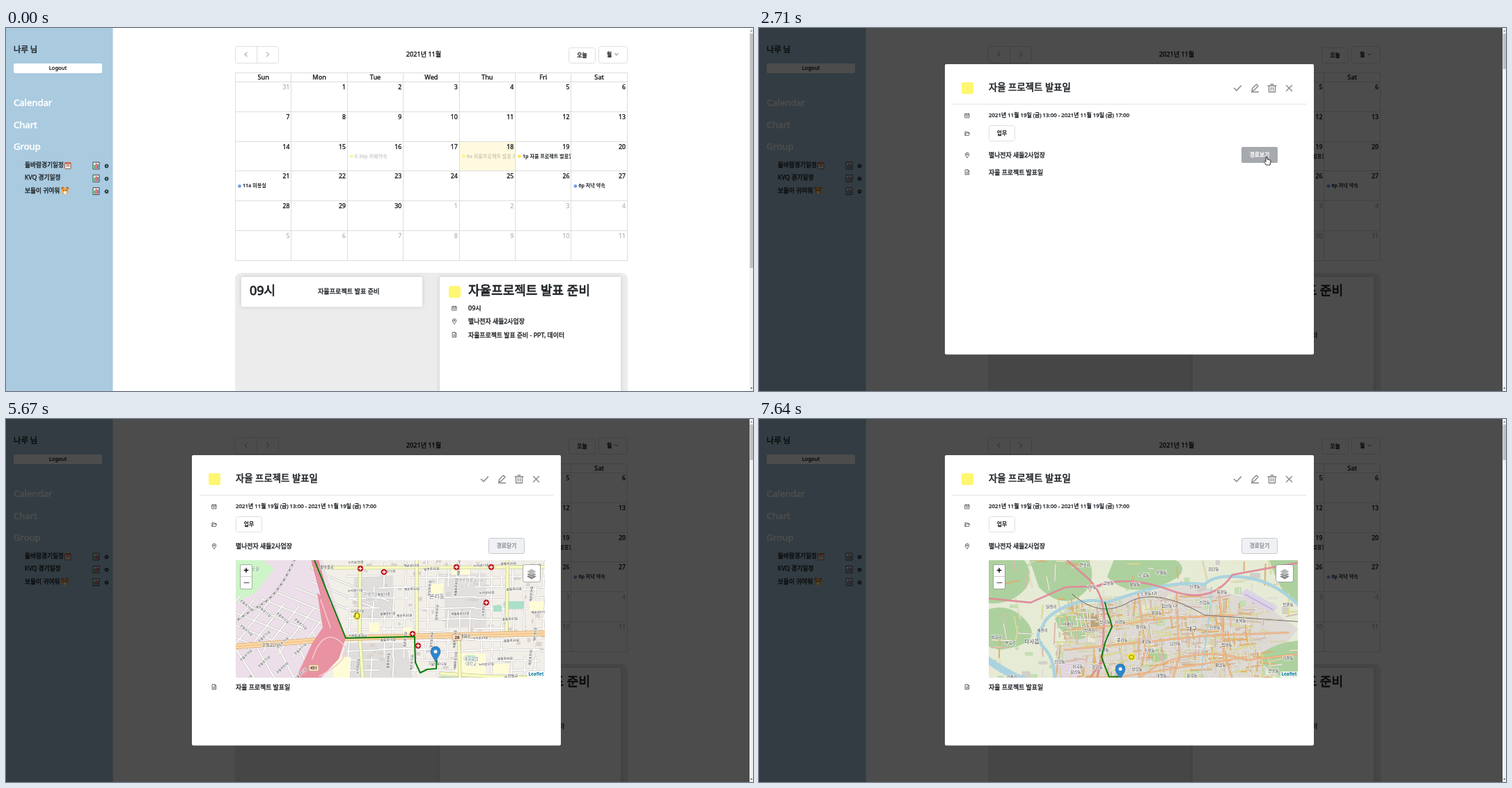
Recreate the animation shown at these times as an HTML page with a canvas. Size 1073x522 px, loop 8 s.

```html
<!DOCTYPE html>
<html lang="ko">
<head>
<meta charset="utf-8">
<title>Calendar</title>
<style>
html, body { margin: 0; width: 100%; height: 100%; overflow: hidden; background: #fff; }
canvas { display: block; }
</style>
</head>
<body>
<canvas id="stage" width="1073" height="522"></canvas>
<script>
const LOOP = 8000;
const FONT = "'Noto Sans', 'Noto Sans CJK KR', 'Noto Sans CJK JP', sans-serif";
const INK = '#212529', YELLOW = '#fff671';
const PLACE = '별나전자 새들2사업장';
let g = document.getElementById('stage').getContext('2d');

// ---------- helpers ----------
// A hairline stroke turns the regular weight into a medium one
function text(s, x, y, size, color = INK, align = 'left', weight = 400) {
  g.font = `${weight} ${size}px ${FONT}`;
  g.textAlign = align;
  g.textBaseline = 'middle';
  g.fillStyle = g.strokeStyle = color;
  g.fillText(s, x, y);
  if (weight > 400) return;
  g.lineWidth = size * .045;
  g.lineJoin = 'round';
  g.strokeText(s, x, y);
}
function label(s, x, y, size, color = '#333', angle = 0) {
  g.save();
  g.translate(x, y);
  g.rotate(angle);
  g.font = `500 ${size}px ${FONT}`;
  g.textAlign = 'center';
  g.textBaseline = 'middle';
  g.lineJoin = 'round';
  g.lineWidth = 1.6;
  g.strokeStyle = 'rgba(255,255,255,.75)';
  g.strokeText(s, 0, 0);
  g.fillStyle = color;
  g.fillText(s, 0, 0);
  g.restore();
}
function box(x, y, w, h, r, fill, stroke) {
  g.beginPath();
  g.roundRect(x, y, w, h, r);
  if (fill) { g.fillStyle = fill; g.fill(); }
  if (stroke) { g.strokeStyle = stroke; g.lineWidth = 1; g.stroke(); }
}
function dot(x, y, r, fill) {
  g.beginPath();
  g.arc(x, y, r, 0, 7);
  g.fillStyle = fill;
  g.fill();
}
function draw(d, x, y, stroke, width = 1, fill) {
  const p = new Path2D(d);
  g.save();
  g.translate(x, y);
  if (fill) { g.fillStyle = fill; g.fill(p); }
  if (stroke) {
    g.strokeStyle = stroke;
    g.lineWidth = width;
    g.lineJoin = g.lineCap = 'round';
    g.stroke(p);
  }
  g.restore();
}
const area = (d, fill) => draw('M' + d + 'Z', 0, 0, null, 0, fill);
function road(d, width, fill, edge) {
  if (edge) draw('M' + d, 0, 0, edge, width + 1.2);
  draw('M' + d, 0, 0, fill, width);
}
function seeded(seed) {
  return () => {
    seed = (seed * 16807) % 2147483647;
    return seed / 2147483647;
  };
}
function layer(x, y, w, h, k, paint) {
  const c = document.createElement('canvas'), main = g;
  c.width = w * k;
  c.height = h * k;
  g = c.getContext('2d');
  g.scale(k, k);
  g.translate(-x, -y);
  paint();
  g = main;
  return () => g.drawImage(c, x, y, w, h);
}

// ---------- icons ----------
const icon = {
  calendar(x, y) {
    draw('M-3-2.5H3V3H-3ZM-3-.8H3M-1.5-3.3V-2M1.5-3.3V-2M-1.5 1H1.5', x, y, '#555', .8);
  },
  folder(x, y) { draw('M-3 2.5V-2.5H-.5L.3-1.5H2.5V-.5M-3 2.5L-1.8-.5H3.5L2.5 2.5Z', x, y, '#444', .8); },
  pin(x, y) {
    draw('M0 3.5C-1.5 1.5-2.7.5-2.7-1A2.7 2.7 0 0 1 2.7-1C2.7.5 1.5 1.5 0 3.5ZM-.9-1A.9.9 0 0 0 .9-1A.9.9 0 0 0-.9-1', x, y, '#444', .8);
  },
  note(x, y) { draw('M-2.5-3.5H1L2.7-1.8V3.5H-2.5ZM1-3.5V-1.8H2.7M-1.2 0H1.4M-1.2 1.7H1.4', x, y, '#444', .8); },
  chart(x, y) {
    box(x - 4.5, y - 5, 9, 10, 0, '#eef3f5', '#38474f');
    box(x - 3, y - 1, 1.7, 5, 0, '#3f9b4b');
    box(x - .8, y - 3.5, 1.7, 7.5, 0, '#d6473f');
    box(x + 1.5, y - 2, 1.7, 6, 0, '#2d77c4');
  },
  gear(x, y) {
    g.setLineDash([1.2, .8]);
    draw('M-2.2 0A2.2 2.2 0 0 1 2.2 0A2.2 2.2 0 0 1-2.2 0', x, y, '#27333b', 1.4);
    g.setLineDash([]);
    draw('M-1.5 0A1.5 1.5 0 0 1 1.5 0A1.5 1.5 0 0 1-1.5 0', x, y, '#27333b', 1);
  }
};

// ---------- calendar page ----------
const colX = i => 329.5 + i * 80.4, rowY = i => 77.5 + i * 42.8;

function calEvent(col, row, s, color, alpha = 1) {
  const x = colX(col), y = rowY(row) + 21.5;
  g.save();
  g.beginPath();
  g.rect(x, y - 8, 79.5, 16);
  g.clip();
  g.globalAlpha = alpha;
  dot(x + 6, y, 2.4, color);
  g.globalAlpha = alpha * (alpha < 1 ? .6 : 1);
  text(s, x + 10.5, y, 7.1, INK, 'left', 700);
  g.restore();
}

const page = layer(0, 0, 1073, 522, 1, () => {
  box(0, 0, 1073, 522, 0, '#fff');
  box(0, 0, 153.5, 522, 0, '#a9cadf');
  text('나루 님', 11, 32, 11.3);
  box(11, 51, 127, 14, 2, '#fff');
  text('Logout', 74.5, 58, 7.6, INK, 'center');
  ['Calendar', 'Chart', 'Group'].forEach((s, i) => text(s, 11, 108.5 + i * 31.5, 13.1, '#fff'));
  ['들바람경기일정', 'KVQ 경기일정', '보들이 귀여워'].forEach((s, i) => {
    const y = 198 + i * 18.3;
    text(s, 27, y - (i == 1 ? 1 : 0), 8.7);
    icon.chart(129.5, y);
    icon.gear(144.5, y + .5);
  });
  box(84.5, 193.5, 8.5, 9, 1, '#f6efe6', '#8b5a45');
  box(84.5, 193, 8.5, 2.5, 0, '#d55a3e');
  text('31', 88.8, 199, 4.5, '#8b3a2a', 'center', 700);
  dot(81.5, 230.5, 2, '#b5642a');
  dot(88, 230.5, 2, '#b5642a');
  dot(84.8, 234.5, 4.8, '#f0a443');
  dot(84.8, 236.7, 2.2, '#fff0d8');
  dot(83, 233.5, .7, INK);
  dot(86.6, 233.5, .7, INK);

  box(329.5, 26.5, 62, 24, 3, '#fff', '#dcdfe6');
  draw('M360.5 26.5V50.5', 0, 0, '#dcdfe6');
  draw('M1.5-3L-1.5 0L1.5 3', 344.5, 38, '#777', .9);
  draw('M-1.5-3L1.5 0L-1.5 3', 376, 38, '#777', .9);
  text('2021년 11월', 600, 38.5, 9.1, INK, 'center');
  box(808.5, 28.5, 38, 22, 3, '#fff', '#dcdfe6');
  text('오늘', 827.5, 39.5, 7.8, INK, 'center');
  box(851.5, 26.5, 41, 24, 3, '#fff', '#dcdfe6');
  text('월', 866.5, 39, 7.8, INK, 'center');
  draw('M-2.5-1.3L0 1.2L2.5-1.3', 877, 38, '#555', .9);

  box(colX(4), rowY(2), 80.4, 42.8, 0, '#fffadf');
  let lines = '';
  for (let i = 0; i < 8; i++) lines += `M${Math.floor(colX(i)) + .5} 64.5V334.5`;
  for (let i = 0; i < 7; i++) lines += `M329.5 ${Math.floor(rowY(i)) + .5}H892.5`;
  draw(lines + 'M329.5 64.5H892.5', 0, 0, '#ddd');
  'Sun Mon Tue Wed Thu Fri Sat'.split(' ').forEach((s, i) => text(s, colX(i) + 40.2, 71, 9.2, INK, 'center'));
  for (let i = 0; i < 42; i++) {
    const inMonth = i > 0 && i < 31;
    const n = i ? (i - 1) % 30 + 1 : 31;
    text(n, colX(i % 7) + 78, rowY(Math.floor(i / 7)) + 8, 8.7, inMonth ? INK : '#bcbebf', 'right');
  }
  calEvent(2, 2, '5:30p 카페약속', '#f5e800', .38);
  calEvent(4, 2, '9a 자율프로젝트 발표 준비', '#f5e800', .38);
  calEvent(5, 2, '1p 자율 프로젝트 발표일', '#fbe94d');
  calEvent(0, 3, '11a 미용실', '#6f9ff0');
  calEvent(6, 3, '6p 저녁 약속', '#6f9ff0');

  box(329, 352, 564, 190, 9, '#ececec');
  g.shadowColor = 'rgba(0,0,0,.14)';
  g.shadowBlur = 6;
  box(338, 358, 260, 43, 2, '#fff');
  box(623, 358, 260, 190, 2, '#fff');
  g.shadowBlur = 0;
  g.shadowColor = 'transparent';
  text('09시', 350, 379, 18);
  text('자율프로젝트 발표 준비', 448, 379.5, 9.1);
  box(636, 371, 17, 17, 3, YELLOW);
  text('자율프로젝트 발표 준비', 664, 379, 18);
  icon.calendar(644, 403);
  icon.pin(644, 422);
  icon.note(644, 441);
  text('09시', 664, 403.5, 9);
  text(PLACE, 664, 422.5, 8.9);
  text('자율프로젝트 발표 준비 - PPT, 데이터', 664, 442, 8.9);
});

function scrollbar(end) {
  box(1068, 0, 5, 522, 0, '#f1f1f1');
  box(1068.5, 8, 4.5, end - 8, 0, '#c1c1c1');
  draw('M-1.5 1L0-1L1.5 1Z', 1070.7, 4, null, 0, '#777');
  draw('M-1.5-1L0 1L1.5-1Z', 1070.7, 518, null, 0, '#444');
}

// ---------- map, street level (marker at 617,350) ----------
const nearMap = layer(120, 100, 930, 370, 1, () => {
  const rnd = seeded(77);
  box(120, 100, 930, 370, 0, '#f2efe9');
  area('120 100L420 100L455 205L488 315L400 470L120 470', '#ecdfe9');
  area('490 322L575 322L585 378L520 420L490 470L430 470', '#dfdedd');
  area('500 225L556 225L556 288L500 288', '#dfdedd');
  area('630 222L690 222L690 300L630 300', '#e2e0df');
  area('120 100L400 100L368 203L385 215L358 250L330 264L120 300', '#cdf5c8');

  // blocks of buildings
  for (let i = 0; i < 420; i++) {
    const x = 490 + rnd() * 540, y = 110 + rnd() * 340;
    box(x, y, 3 + rnd() * 6, 2 + rnd() * 4, 0, '#dbd3cd');
  }
  // side streets
  let grid = '';
  for (let x = 494; x < 1040; x += 15.5)
    for (let y = 105; y < 460; y += 34)
      if (rnd() < .72) grid += `M${x + rnd() * 4} ${y}l${rnd() * 3 - 3} 34`;
  for (let y = 106; y < 460; y += 15)
    for (let x = 490; x < 1040; x += 46)
      if (rnd() < .72) grid += `M${x} ${y + rnd() * 4}l46 ${rnd() * 3 - 2}`;
  for (let i = 0; i < 14; i++)
    grid += `M${150 + i * 24} ${450 - i * 7}l${-60 + i * 3} -52M${190 + i * 21} ${225 + i * 4}l-52 66M${150 + i * 24} ${330 - i * 8}l88 36`;
  road(grid.slice(1), 1.8, '#fff', '#cbc6c2');

  [[470, 342, 24, 32], [645, 337, 44, 30], [610, 237, 18, 14], [522, 293, 14, 14], [640, 215, 26, 9],
   [570, 300, 14, 9], [700, 352, 22, 14], [752, 262, 20, 14]].forEach(r => box(...r, 0, '#fdfcd6'));
  [[716, 262, 28, 11], [700, 268, 12, 9], [660, 340, 14, 8]].forEach(r => box(...r, 0, '#aae0cb'));
  area('515 470L524 422L536 404L590 382L625 370L690 373L682 470', '#add19e');
  for (let i = 0; i < 14; i++) text('ılı', 560 + rnd() * 110, 394 + rnd() * 38, 4, '#8bb67d');

  draw('M420 190Q395 250 368 266T300 312L200 350', 0, 0, '#8c8c8c', 2.4);
  g.setLineDash([4, 4]);
  draw('M420 190Q395 250 368 266T300 312L200 350', 0, 0, '#fff', 1.4);
  g.setLineDash([]);

  // main roads
  const pale = '#f7fabf', paleEdge = '#bdbd8c';
  ['440 214L1050 212', '509 100L508 312L513 380L508 470', '590 100L590 313', '722 100L719 308',
   '625 366L690 370L760 372L850 384L1050 392', '650 312L652 370L648 470', '797 100L796 312L830 330',
   '390 424Q470 404 515 412L536 402'].forEach(d => road(d, 4, pale, paleEdge));
  road('850 300L800 375L750 470', 6, '#fcd6a4', '#c79a5c');
  road('120 352L330 327L490 315L774 308L1050 318', 7, '#fcd6a4', '#c79a5c');
  draw('M120 352L330 327L490 315L774 308L1050 318', 0, 0, '#e2b478', .7);
  road('420 100L445 208L470 300L455 345L405 470', 9, '#e892a2', '#d26a80');
  area('447 250L470 268L488 315L478 345L452 372L422 440L402 440L420 365L440 322L455 300', '#e892a2');
  draw('M440 345Q455 300 480 320T450 370M452 260L466 300', 0, 0, '#f6c9d0', 1.5);

  // labels
  const names = ['누리로', '솔들로', '해온로', '달보로', '새봄동로'];
  for (let i = 0; i < 105; i++) {
    const x = 500 + (i % 15) * 36 + rnd() * 14, y = 206 + Math.floor(i / 15) * 34 + rnd() * 14;
    const park = x > 515 && x < 695 && y > 375;
    if (!park) label(names[i % 5] + (1 + Math.floor(rnd() * 50)) + '길', x, y, 4.6, '#333', rnd() < .4 ? -1.5 : -.05);
  }
  for (let i = 0; i < 14; i++)
    label('온들로' + (70 + i) + '길', 345 + (i % 4) * 26, 268 + i * 9, 4.6, '#444', i < 5 ? .7 : -.75);
  label('공원', 358, 216, 6.5, '#4b8a4b');
  label('솔마을로', 461, 213, 5.5);
  label('온들공단로', 381, 325, 5.5);
  label('새봄로', 660, 312, 5.5);
  label('큰들네거리', 507, 313, 5);
  label('학들로', 728, 370, 5.5);
  label('한별백조', 524, 252, 5.5, '#888');
  label('아파트', 524, 260, 5.5, '#888');
  label('푸른마을 2단지', 668, 232, 5.5, '#888');
  label('본리동', 619, 256, 8, '#777');
  label('대구공업', 668, 345, 5.8, '#777');
  label('대학교', 668, 352, 5.8, '#777');
  label('달들마을', 532, 380, 5.8, '#777');
  label('4단지아파트', 532, 387, 5.8, '#777');
  [[442, 358, '451'], [648, 314, '28']].forEach(([x, y, s]) => {
    box(x - 7, y - 4.5, 14, 9, 2, '#f9dcc0', '#d9a98c');
    text(s, x, y, 6, '#444', 'center');
  });
  [[509, 215], [543, 220], [647, 213], [697, 213], [584, 309], [592, 326], [690, 264], [810, 317], [824, 316],
   [784, 326], [796, 325], [812, 327], [623, 377], [830, 359], [812, 373], [821, 369], [818, 386], [787, 406],
   [791, 416]].forEach(([x, y]) => {
    dot(x, y, 4.2, '#c00d18');
    draw('M-2.2 0H2.2M0-2.2V2.2', x, y, '#fff', 1.3);
  });
});

// ---------- map, city level (marker at 519,373) ----------
const farMap = layer(320, 190, 464, 270, 2, () => {
  const rnd = seeded(4242);
  box(320, 190, 464, 270, 0, '#e6ebd6');
  area('430 330L490 260L620 235L720 260L774 300L720 370L690 415L560 430L530 460L440 460', '#dedad6');
  area('420 350L470 345L485 400L450 405', '#e3d5df');
  for (let i = 0; i < 130; i++)
    box(322 + rnd() * 440, 195 + rnd() * 250, 4 + rnd() * 12, 3 + rnd() * 9, 2, ['#c3dfb2', '#ebe8d2', '#d2ceca'][i % 3]);

  const wood = '#add19e';
  ['320 190L372 190Q402 222 380 245T320 262', '385 190L470 190Q490 232 462 252T402 240',
   '320 275Q360 258 385 290T345 330L320 322', '425 285Q452 262 480 275Q498 300 470 312T425 285',
   '510 200Q560 185 602 203Q622 222 575 238T500 225', '730 190L784 190L784 270Q750 262 730 190',
   '715 340Q740 318 784 316L784 378Q735 368 715 340',
   '556 460Q564 418 578 394T620 385Q650 388 668 405T708 408Q722 374 784 366L784 460',
   '393 402Q410 382 425 408Q414 436 400 422', '330 385Q365 374 392 392Q396 408 362 412T330 400',
   '560 335Q574 322 584 334T566 348'].forEach(d => area(d, wood));
  for (let i = 0; i < 26; i++)
    draw('M0 0q6-5 10 0t9 2', 590 + rnd() * 165, 410 + rnd() * 40, '#9cc48d', .8);
  area('470 282Q482 272 490 288Q488 304 474 304Q464 296 470 282', '#b8a57e');

  // street mesh, thinning out into the country and the hills
  const tones = ['#fff', '#f4f49c', '#fff', '#f6c586', '#f4f49c', '#fff', '#eeb0a4'];
  for (let i = 0; i < 1100; i++) {
    const city = i < 970;
    const x = city ? 425 + rnd() * 310 : 325 + rnd() * 440, y = city ? 252 + rnd() * 185 : 195 + rnd() * 255;
    const hills = x > 560 && y > 385;
    const len = 5 + rnd() * 26, a = (rnd() < .5 ? 0 : 1.57) + rnd() * .4 - .25, tone = i % 7;
    if (hills) continue;
    road(`${x} ${y}l${len * Math.cos(a)} ${len * Math.sin(a)}`, .8, tones[tone], ['#c4bcae', '#c8c48c', '#c9c3ba', '#cf9f62'][tone % 4]);
  }

  // water
  const river = (d, w) => road(d, w, '#aad3df');
  river('320 338Q355 365 385 375T424 398Q422 418 390 421T320 452', 10);
  river('784 275Q745 232 700 226T640 236Q600 232 560 243T500 262Q470 254 440 268T408 296Q392 310 412 330Q428 350 424 390', 4.5);
  river('650 240Q646 300 638 340T655 440', 2);
  dot(697, 383, 3, '#aad3df');

  // trunk roads and rail
  area('690 250L700 242L745 268L738 278', '#dcd3e6');
  draw('M698 250L738 272', 0, 0, '#bbaed0', 1.5);
  ['430 190L470 225Q500 250 495 300L493 345Q480 390 452 460', '485 238Q530 222 590 244T680 222L784 203',
   '320 430Q380 440 420 420T492 345', '320 255L390 262L440 240L490 238']
    .forEach(d => road(d, 1.3, '#e892a2', '#d77f92'));
  ['430 372L519 369L600 356L700 340', '545 250L555 330L530 440', '600 250L604 340L590 385',
   '440 330L520 322L640 310L760 305', '660 240L668 330L690 410', '450 300Q520 296 570 285L680 280',
   '535 385Q560 350 610 340T700 345L784 335'].forEach(d => road(d, 1.2, '#f9c79b', '#d9986a'));
  draw('M450 250Q490 285 530 262T640 280L784 290', 0, 0, '#77706c', 1);
});
const towns = `노곡동 553 223|무태동 578 219|검단동 653 214|복현동 665 247|산격동 626 239|노원동3가 560 249|
신암동 640 262|방촌동 760 265|침산동1가 590 267|원대동 571 277|사수동 477 240|금호동 502 234|팔달동 540 236|달천리 420 268|
연호리 468 208|교리 347 210|박곡리 341 312|부곡리 361 320|서재리 444 293|방천리 475 302|상리동 497 290|이현동 519 290|
평리동 549 297|세천리 407 302|중리동 522 316|내당동 556 318|용산동 495 330|두류동 561 331|신천동 655 298|효목동 692 288|
범어동 672 323|남산동 598 321|이곡동 458 354|신당동 432 347|장기동 486 355|갈산동 455 362|성당동 543 358|대명동 578 367|
봉덕동 622 367|황금동 663 352|연호동 739 360|가천동 760 342|월암동 459 387|월성동 480 399|송현동 541 390|상인동 527 411|
도원동 514 431|지산동 672 398|범물동 693 410|파동 644 415|구라리 448 412|호림동 425 374|광촌리 363 369`
  .split('|').map(s => s.trim().split(' '));
const cities = [['대구', 622, 301], ['다사읍', 392, 319], ['화원읍', 449, 440], ['산면', 335, 402]];

// ---------- motion ----------
const path = [
  [460, 1064, 510], [700, 872, 318], [940, 714, 184], [1230, 773, 183], [2300, 773, 183], [2640, 730, 189],
  [3670, 730, 189], [4050, 560, 232], [4380, 362, 256], [4510, 372, 257], [4790, 456, 260], [4860, 461, 270],
  [5300, 521, 322], [5600, 504, 283], [5670, 504, 283], [5880, 507, 290], [7020, 507, 290], [7230, 537, 265],
  [7640, 535, 342]
];
function pointer(t) {
  const i = path.findIndex(p => p[0] > t);
  if (i < 0) return path[path.length - 1].slice(1);
  if (!i) return path[0].slice(1);
  const [a, ax, ay] = path[i - 1], [b, bx, by] = path[i];
  const k = (t - a) / (b - a);
  return [ax + (bx - ax) * k, ay + (by - ay) * k];
}
// Marker position and zoom: three drags and two wheel zooms about the pointer
function view(t) {
  let x = 552, y = 288, s = 1;
  const drag = (from, to) => {
    if (t <= from) return;
    const a = pointer(from), b = pointer(Math.min(t, to));
    x += b[0] - a[0];
    y += b[1] - a[1];
  };
  drag(4790, 5300);
  drag(5670, 5880);
  if (t >= 6290) {
    s = t < 6420 ? .5 : t < 6820 ? .25 : t < 6870 ? .18 : .125;
    const [cx, cy] = pointer(6290);
    x = cx + (x - cx) * s;
    y = cy + (y - cy) * s;
  }
  drag(7230, 7640);
  return { x: Math.round(x), y: Math.round(y), s };
}

// offsets from the marker at street level
const route = [[2, -3], [1, 9], [-12, 10], [-22, 15], [-29, 0], [-30, -37], [-129, -35], [-174, -147], [-216, -264],
  [-176, -424], [-144, -504], [-96, -608], [-120, -704], [-144, -760], [-176, -888]];

function drawMap(t) {
  const { x, y, s } = view(t);
  g.save();
  g.beginPath();
  g.rect(330, 203, 444, 169);
  g.clip();
  box(330, 203, 444, 169, 0, '#ddd');
  if (t >= 3130) {
    const near = s >= .5, k = near ? s : s * 8;
    const [ox, oy] = near ? [617, 350] : [519, 373];
    g.save();
    g.translate(x, y);
    g.scale(k, k);
    g.translate(-ox, -oy);
    (near ? nearMap : farMap)();
    g.restore();
    if (!near) {
      const put = size => ([n, px, py]) => label(n, x + (px - ox) * k, y + (py - oy) * k, size);
      towns.forEach(put(5.6));
      cities.forEach(put(7.6));
    }
  }
  if (t >= 3270) {
    const d = 'M' + route.map(([px, py]) => `${x + px * s} ${y + py * s}`).join('L');
    draw(d, 0, 0, '#0a7d0a', 2);
    g.save();
    g.translate(x, y);
    draw('M0 0C-1.5-6-7-10-7-16A7 7 0 0 1 7-16C7-10 1.5-6 0 0Z', 0, 0, '#2b6fa8', .7, '#2e85cb');
    dot(0, -15.5, 2.5, '#fff');
    g.restore();
  }
  box(336.5, 209.5, 17, 35, 2, '#fff', 'rgba(0,0,0,.3)');
  draw('M337 226.5H353', 0, 0, '#ccc');
  draw('M-2.7 0H2.7M0-2.7V2.7', 345, 217.5, '#000', 1.4);
  draw('M-3.5 0H3.5', 345.5, 235.5, '#333', .9);
  box(742.5, 209.5, 25, 25, 3, '#fff', 'rgba(0,0,0,.3)');
  [[5, '#777'], [2, '#999'], [-2, '#b5b5b5']].forEach(([dy, c]) => draw('M0-4L7 0L0 4L-7 0Z', 755, 221.5 + dy, '#fff', .5, c));
  box(749, 363, 25, 9, 0, 'rgba(255,255,255,.75)');
  text('Leaflet', 761.5, 367.5, 6.3, '#0078a8', 'center', 600);
  g.restore();
}

function drawModal(t) {
  const open = t >= 2850;
  box(267, 52, 530, 417.5, 2, '#fff');
  box(291, 78, 17, 17, 3, YELLOW);
  text('자율 프로젝트 발표일', 330, 86, 13.4);
  draw('M278 109.5H786', 0, 0, '#e3e3e3');
  draw('M-5 0L-1.5 3.5L5-3.5', 687.5, 86.5, '#888', 1.5);
  draw('M-4 4.5L-3.5 1L2.5-5L5-2.5L-1 3.5ZM-4.5 6H5.5', 712, 86, '#888', 1.4);
  draw('M-6-3.5H6M-2-5.5H2M-4.5-3.5V5.5H4.5V-3.5M-1.5-1V3M1.5-1V3', 737, 86.5, '#888', 1.4);
  draw('M-4-4L4 4M4-4L-4 4', 761.5, 86.5, '#888', 1.4);
  icon.calendar(299, 126);
  icon.folder(299, 151.5);
  icon.pin(299, 183);
  text('2021년 11월 19일 (금) 13:00 - 2021년 11월 19일 (금) 17:00', 330, 126, 7.85);
  box(330.5, 140.5, 37, 22, 3, '#fff', '#dcdfe6');
  text('업무', 349, 151.5, 7.8, INK, 'center');
  text(PLACE, 330, 183, 8.9);
  const hover = t >= 2560 && t < 3740;
  if (open && !hover) box(693.5, 171.5, 51, 22, 2, '#f0f1f4', '#c8c9cc');
  else box(693, 171, 52, 23, 2, hover ? '#a6a9ad' : '#909399');
  text(open ? '경로닫기' : '경로보기', 719, 182.5, 7.8, open && !hover ? '#909399' : '#fff', 'center');
  const y = open ? 386 : 208;
  icon.note(299, y - .7);
  text('자율 프로젝트 발표일', 330, y, 8.9);
  if (open) drawMap(t);
}

const between = (t, a, b) => t >= a && t < b;
function drawCursor(t) {
  if (t < 460) return;
  const [x, y] = pointer(t);
  const fist = between(t, 4790, 5300) || between(t, 5700, 5880) || t >= 7260;
  if (fist || between(t, 1630, 1770) || between(t, 5600, 5700) || between(t, 7160, 7260)) dot(x, y, 5.5, 'rgba(255,238,0,.75)');
  if (between(t, 880, 1770)) {
    draw('M-2-4.5Q0-4.5 0-3.5Q0-4.5 2-4.5M0-3.5V3.5M-2 4.5Q0 4.5 0 3.5Q0 4.5 2 4.5', x, y, '#000', 1);
  } else if (between(t, 2560, 3740)) {
    draw('M-2 1V-4Q-1-6 0-4V-1Q1-2 2-.5Q3-1.2 3.8 0Q5-.5 5 1.5L4 7H-1.5L-4.5 2.5Q-4 .5-2 2Z', x, y + 1, '#000', .8, '#fff');
  } else if (fist) {
    draw('M-3-1Q-2-3-.8-2Q.3-3.2 1.3-2Q3-2.6 3.4-.6L2.5 3H-2Z', x, y, '#554c00', .7);
  } else if (t >= 3950) {
    draw('M-2.5 0L-3-3Q-2-4-1.5-2.5L-1-4.5Q0-5.5.5-4.5L1-4Q2-4.5 2.3-3L2.5-2.5Q4-3 3.8-1L2.7 4H-1.5L-4.5.5Q-4-.8-2.5.8Z', x, y, '#333', .7, t > 5600 ? '#fff04a' : '#fff');
  } else {
    draw('M0 0V9L2.1 7L3.6 10.2L5 9.6L3.6 6.5H6.5Z', x, y, '#000', .7, '#fff');
  }
}

function render(t) {
  page();
  if (between(t, 880, 1050)) box(652, 179, 78, 11, 2, 'rgba(0,0,0,.12)');
  if (between(t, 1230, 1770)) box(732.5, 179, 78, 11, 2, 'rgba(0,0,0,.1)');
  const shown = t >= 1770;
  if (shown) {
    const k = t < 1840 ? .5 : 1;
    box(0, 0, 1068, 522, 0, `rgba(0,0,0,${.7 * k})`);
    g.save();
    g.globalAlpha = k;
    g.translate(0, -10 * (1 - k));
    drawModal(t);
    g.restore();
  }
  scrollbar(shown ? 59 : 345);
  drawCursor(t);
}

const start = performance.now();
function tick() {
  render((performance.now() - start) % LOOP);
  requestAnimationFrame(tick);
}
tick();
</script>
</body>
</html>
```
